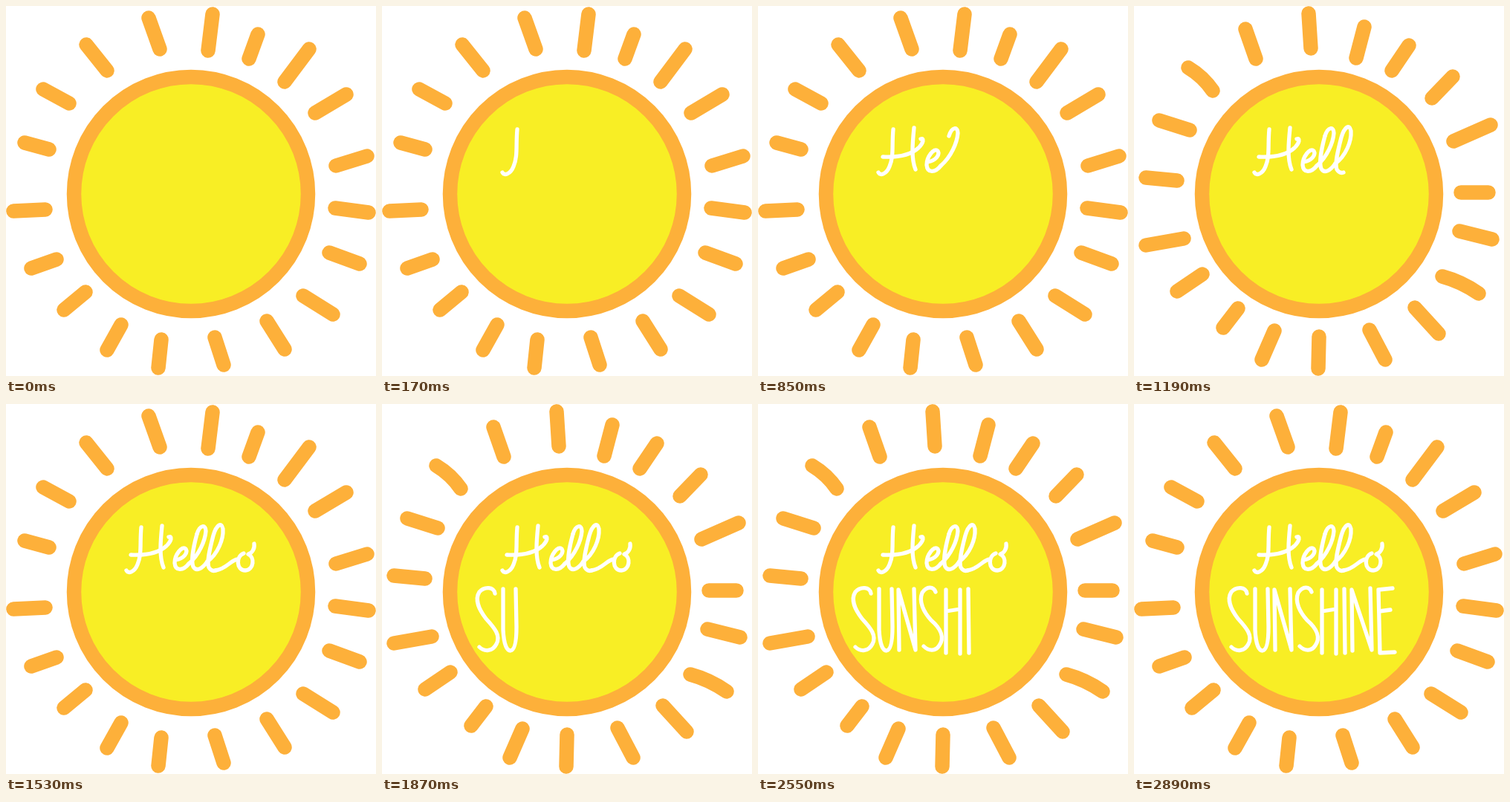
Recreate the animation shown at these times as an HTML page. Size 498 px wide and 498 px high, loop 3.06 s.

```html
<!DOCTYPE html>
<html lang="en">
<head>
<meta charset="utf-8">
<title>Hello Sunshine</title>
<style>
  html, body { margin: 0; width: 100%; height: 100%; overflow: hidden; background: #fff; }
  svg { display: block; width: 100vw; height: 100vh; }
  path { fill: none; stroke-linecap: round; stroke-linejoin: round; }
  .rays { stroke: #fdb03a; stroke-width: 19.5; }
  .pen { stroke: #fff; stroke-width: 5.3; }
</style>
</head>
<body>
<svg viewBox="0 0 498 498" role="img" aria-label="Hello Sunshine">
  <circle cx="249" cy="253" r="157.5" fill="#f8ee25" stroke="#fdb03a" stroke-width="19.5"/>
  <path class="rays" d="M192 16L207 58M278 11L272 60M339 38L327 71M408 58L375 102M458 119L416 144
    M486 202L444 215M488 278L443 272M476 347L435 332M440 415L400 390M375 462L351 424
    M293 483L281 446M205 487L209 449M136 463L155 429M78 409L107 385M34 353L68 341
    M10 276L53 274M25 184L58 193M50 112L85 131M108 52L136 87"/>
  <path class="rays" d="M150 31L164 71M235 10L238 57M310 28L299 70M370 53L347 87M429 95L401 124
    M480 160L430 182M477 251L440 251M482 314L438 303M415 364Q441 371 464 387M410 441L378 406
    M338 476L317 436M248 488L249 445M172 476L189 437M120 433L140 407M58 384L92 361
    M16 322L67 313M16 231L58 235M34 154L75 167M73 83Q93 95 106 114"/>
</svg>
<script>
  const STEP = 170, STEPS = 18;

  // One pen stroke is added per step.
  const strokes = [
    'M182 166C180 188 183 202 177 216C173 226 165 229 162 224',
    'M210 164C208 184 206 206 212 220',
    'M168 203C188 204 206 200 216 191C223 184 224 177 219 179',
    'M228 210C240 208 245 200 242 195C237 190 227 203 227 214C228 226 239 224 246 215',
    'M246 215C260 203 268 184 269 171C269 162 261 162 257 175',
    'M257 175C252 193 249 212 252 219C256 226 264 222 271 212',
    'M271 212C285 202 293 182 292 168C290 158 283 163 279 177C274 196 270 213 273 220C276 225 279 225 282 224',
    'M282 224C297 222 302 210 312 209',
    'M320 201C309 205 310 224 322 224C334 223 335 206 326 202C331 201 335 195 334 188',
    'M152 255C151 246 138 245 131 253C124 264 131 277 140 289C152 302 160 312 154 323C149 333 138 334 131 327',
    'M163 249L163 304C164 324 168 332 173 332C180 331 181 313 181 300L180 249',
    'M190 331L189 250L212 331L210 249',
    'M239 253C236 245 227 245 221 254C216 266 223 280 233 291C247 303 251 315 244 325C239 333 230 333 223 326',
    'M253 250L253 335M272 250L272 336M253 279L272 276',
    'M283 249L284 335',
    'M294 332L293 250L320 331L318 248',
    'M329 250L331 335L351 334M329 250L348 248M330 279L345 277'
  ];

  const svg = document.querySelector('svg');
  const rays = document.querySelectorAll('.rays');
  const show = (node, on) => node.setAttribute('visibility', on ? 'visible' : 'hidden');

  const pen = strokes.map(d => {
    const path = document.createElementNS('http://www.w3.org/2000/svg', 'path');
    path.setAttribute('class', 'pen');
    path.setAttribute('d', d);
    return svg.appendChild(path);
  });

  function draw(now) {
    const step = Math.floor(now / STEP) % STEPS;
    rays.forEach((set, i) => show(set, (step >> 1) % 2 === i));
    pen.forEach((path, i) => show(path, i < step));
  }

  function tick() {
    draw(performance.now());
    requestAnimationFrame(tick);
  }
  tick();
</script>
</body>
</html>
```
